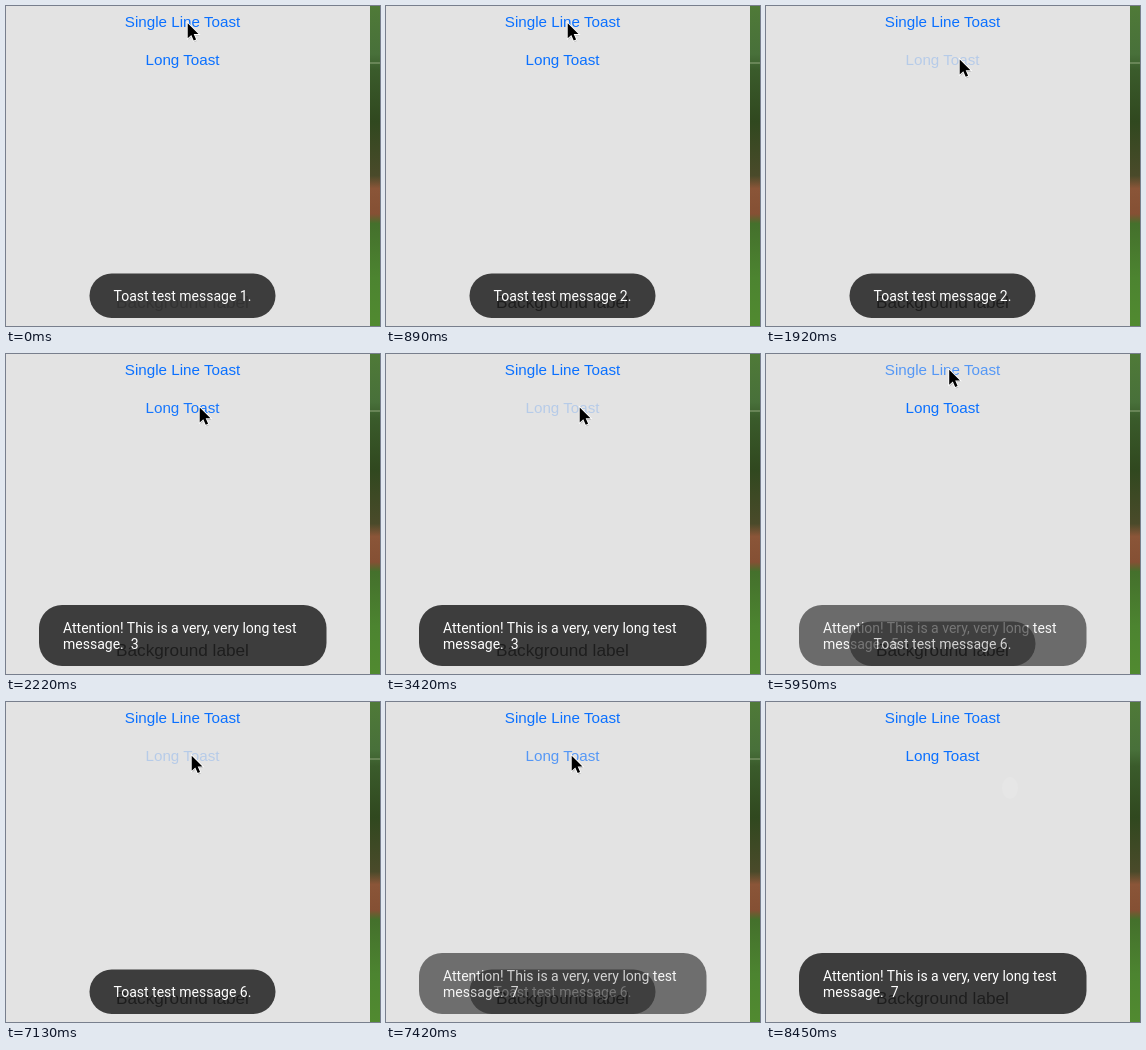
An HTML page for the animation above (8.55 s loop, 374 by 320 pixels).

```html
<!DOCTYPE html>
<html lang="en">
<head>
<meta charset="utf-8">
<title>Toast demo</title>
<style>
  html, body { margin: 0; width: 100%; height: 100%; overflow: hidden; background: #e3e3e3; }
  svg { display: block; }
  .ui { font-family: "Liberation Sans", Arial, sans-serif; text-anchor: middle; }
  .button { font-size: 15.2px; fill: #0a70ff; }
  .toast text { font: 14px Roboto, sans-serif; fill: #fff; white-space: pre; }
  .toast rect { fill: #222; fill-opacity: .86; }
</style>
</head>
<body>
<svg width="374" height="320" viewBox="0 0 374 320">
  <defs>
    <linearGradient id="garden" x1="0" y1="0" x2="0" y2="1">
      <stop offset="0" stop-color="#4f7a38"/>
      <stop offset=".15" stop-color="#48703a"/>
      <stop offset=".2" stop-color="#3a5b2b"/>
      <stop offset=".36" stop-color="#30481f"/>
      <stop offset=".53" stop-color="#4a4a2a"/>
      <stop offset=".57" stop-color="#8a5538"/>
      <stop offset=".65" stop-color="#855034"/>
      <stop offset=".68" stop-color="#44702c"/>
      <stop offset=".85" stop-color="#4c8430"/>
      <stop offset="1" stop-color="#518a30"/>
    </linearGradient>
  </defs>
  <rect width="374" height="320" fill="#e3e3e3"/>
  <rect x="364" width="10" height="320" fill="url(#garden)"/>
  <rect id="fence" x="364" y="56.5" width="10" height="1" fill="#8fa67c"/>
  <g class="ui">
    <text id="single" class="button" x="176.5" y="21">Single Line Toast</text>
    <text id="long" class="button" x="176.5" y="59">Long Toast</text>
    <text id="label" x="176.5" y="302" font-size="17.2">Background label</text>
  </g>
  <g id="toasts"></g>
  <ellipse id="trace" cx="244" cy="86" rx="8" ry="11" fill="#e6e6e6"/>
  <g id="cursor">
    <path d="M.8 1.5V16.5L4.4 13.2 6.8 18.8 9.2 17.8 6.8 12.3H11.6Z" fill="#000" opacity=".18"/>
    <path d="M0 0V15L3.6 11.7 6 17.3 8.4 16.3 6 10.8H10.8Z" stroke="#fff" stroke-width="1.6" paint-order="stroke"/>
  </g>
</svg>
<script>
const LOOP = 8550;
const STEP = 145;
const $ = id => document.getElementById(id);

// Each tap dims a button; its release brings up the next toast.
const taps = [
  { button: "single", press: 440, release: 590 },
  { button: "long", press: 1920, release: 2070 },
  { button: "long", press: 3420, release: 3720 },
  { button: "long", press: 4620, release: 4770 },
  { button: "single", press: 5800, release: 5950 },
  { button: "long", press: 7130, release: 7280 },
];

// Pointer tip: time, x, y; each position holds until the next.
const pointer = [
  [0, 181.7, 17.3], [1180, 182.5, 20], [1330, 185, 28], [1480, 189, 40],
  [1630, 192, 49], [1770, 193.7, 53.5],
  [5360, 187.7, 33.7], [5510, 184.5, 21], [5660, 183.2, 15.7],
  [6690, 184, 23], [6840, 185, 39], [6990, 185.7, 53.7],
  [7570, 239, 77],
];
const POINTER_GONE = 7720;

const singleToast = n => `
  <rect x="83.5" y="267.5" width="186" height="44.5" rx="22.2"/>
  <text x="107.5" y="295">Toast test message ${n}.</text>`;

const longToast = n => `
  <rect x="33" y="251" width="287.5" height="61" rx="23"/>
  <text x="57" y="278.5">Attention! This is a very, very long test</text>
  <text x="57" y="294.8">message.  ${n}</text>`;

const kinds = ["single", ...taps.map(tap => tap.button)];
$("toasts").innerHTML = kinds.map((kind, i) =>
  `<g class="toast">${(kind === "single" ? singleToast : longToast)(i + 1)}</g>`).join("");
const toasts = [...$("toasts").children];

const stepsSince = (t, start) => Math.floor((t - start) / STEP);

function buttonOpacity(id, t) {
  const tap = taps.filter(item => item.button === id && item.press <= t).pop();
  if (!tap) return 1;
  if (t < tap.release) return .2;
  return [.65, .94][stepsSince(t, tap.release)] ?? 1;
}

function toastOpacity(i, t) {
  const shown = i ? taps[i - 1].release : -LOOP;
  const replaced = i < taps.length ? taps[i].release : Infinity;
  if (t < shown || t >= replaced + STEP) return 0;
  if (t >= replaced) return .72;
  return t < shown + STEP ? .7 : 1;
}

function render(t) {
  for (const id of ["single", "long"]) $(id).setAttribute("opacity", buttonOpacity(id, t));
  toasts.forEach((toast, i) => toast.setAttribute("opacity", toastOpacity(i, t)));
  $("label").setAttribute("opacity", t < taps[0].release ? .35 : 1);

  const [, x, y] = pointer.filter(([time]) => time <= t).pop();
  const gone = t >= POINTER_GONE;
  $("cursor").setAttribute("transform", `translate(${x} ${y})`);
  $("cursor").setAttribute("opacity", gone ? 0 : 1);
  $("trace").setAttribute("opacity", gone ? 1 : 0);
  $("fence").setAttribute("opacity", t < 8450 ? 1 : 0);
}

const start = performance.now();
function tick() {
  render((performance.now() - start) % LOOP);
  requestAnimationFrame(tick);
}
tick();
</script>
</body>
</html>
```
